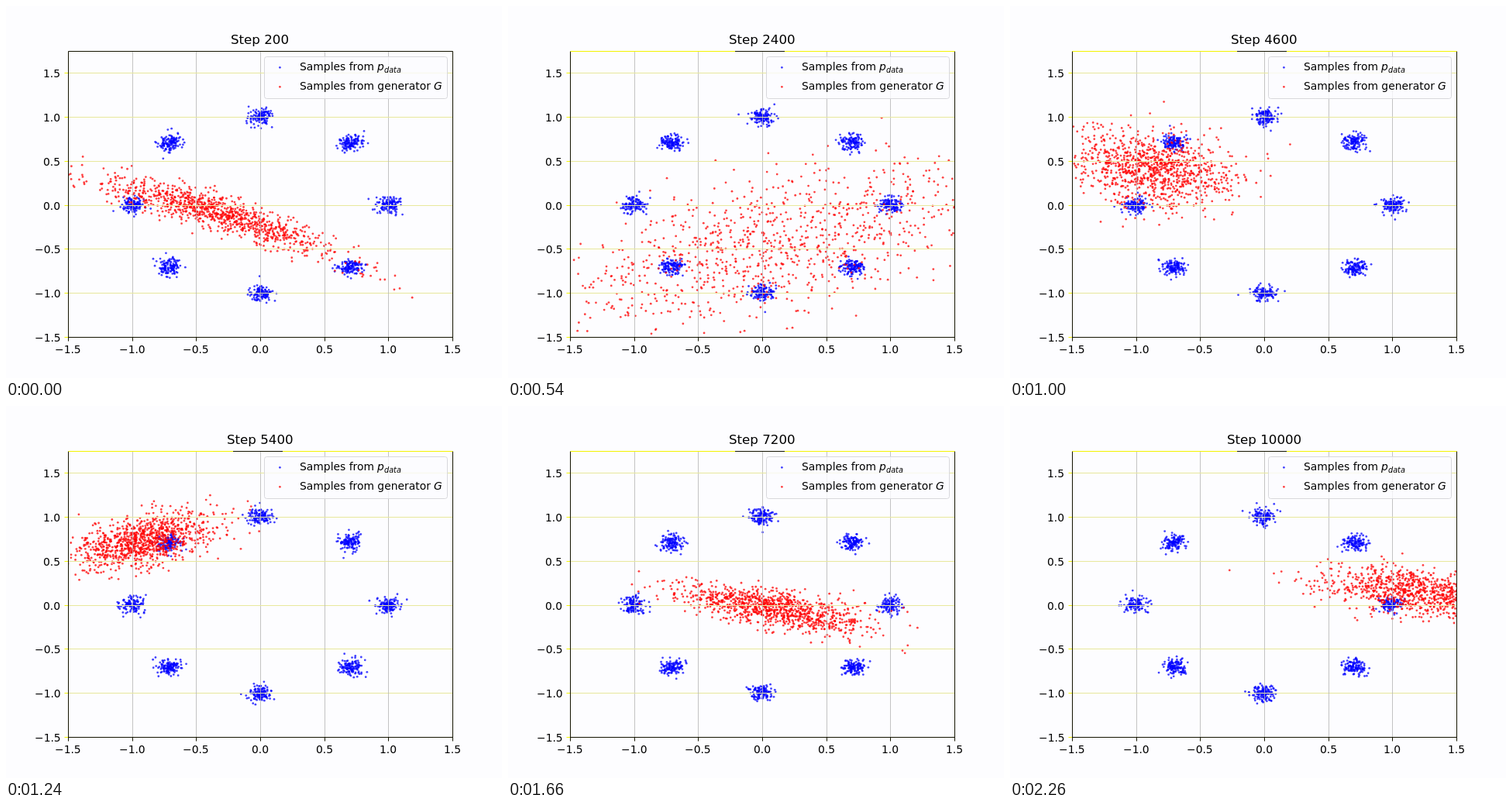
These frames come from a looping animation (640x480 px, 2280 ms). An HTML page with a canvas:

```html
<!DOCTYPE html>
<html lang="en">
<head>
<meta charset="utf-8">
<title>Generator samples</title>
<style>
  html, body { margin: 0; width: 100%; height: 100%; overflow: hidden; background: #fdfdff; }
  canvas { display: block; width: 640px; height: 480px; }
</style>
</head>
<body>
<canvas id="stage" width="640" height="480"></canvas>
<script>
const ctx = document.getElementById('stage').getContext('2d');
const FONT = '"DejaVu Sans", sans-serif';
const LOOP = 2280, STEPS = 50, SAMPLES = 1000;
const BOX = { left: 80, top: 57.6, right: 576, bottom: 427.2 };
const COLOR = { paper: '#fdfdff', data: '#0000ff', generated: '#ff0000',
                rowGrid: '#e8e89c', columnGrid: '#b4b4b4', spine: '#141400', yellow: '#f4f400' };

const px = x => 328 + x * 496 / 3;
const py = y => BOX.bottom - (y + 1.5) * 369.6 / 3.25;
const snap = v => Math.round(v) + 0.5;

// Generator cloud in pixels: y = my + slope*dx + bend*dx^2, with spreads sx and sy.
const CLOUDS = [
  { at: 0,  mx: 272, my: 266, sx: 78,  sy: 11, slope: 0.3,   bend: 0.0003 },
  { at: 11, mx: 340, my: 306, sx: 145, sy: 46, slope: -0.25, bend: 0 },
  { at: 17, mx: 190, my: 256, sx: 57,  sy: 35, slope: 0.52,  bend: 0 },
  { at: 26, mx: 176, my: 174, sx: 46,  sy: 16, slope: -0.2,  bend: 0 },
  { at: 35, mx: 345, my: 261, sx: 62,  sy: 12, slope: 0.17,  bend: 0.0001 },
  { at: 41, mx: 262, my: 204, sx: 41,  sy: 12, slope: 0.4,   bend: 0 },
  { at: 49, mx: 535, my: 241, sx: 64,  sy: 15, slope: 0.11,  bend: 0 }
];

function cloudAt(step) {
  const next = Math.max(1, CLOUDS.findIndex(c => c.at >= step));
  const a = CLOUDS[next - 1], b = CLOUDS[next];
  const k = (step - a.at) / (b.at - a.at);
  const mixed = {};
  for (const key in a) mixed[key] = a[key] + (b[key] - a[key]) * k;
  return mixed;
}

function randomSource(seed) {
  let s = seed >>> 0;
  return () => {
    s = (s + 0x6D2B79F5) >>> 0;
    let t = Math.imul(s ^ (s >>> 15), s | 1);
    t ^= t + Math.imul(t ^ (t >>> 7), t | 61);
    return ((t ^ (t >>> 14)) >>> 0) / 4294967296;
  };
}

function gaussianSource(seed) {
  const random = randomSource(seed);
  return () => Math.sqrt(-2 * Math.log(1 - random())) * Math.cos(2 * Math.PI * random());
}

// Every third step, beginning with the second, is held for 100 ms.
const holdOf = step => step % 3 === 1 && step < STEPS - 1 ? 100 : 20;

function stepAt(time) {
  let step = 0;
  for (let end = holdOf(0); time >= end && step < STEPS - 1; end += holdOf(step)) step++;
  return step;
}

function dot(x, y, color) {
  ctx.globalAlpha = 0.74;
  ctx.fillStyle = color;
  ctx.beginPath();
  ctx.arc(x, y, 1.4, 0, 2 * Math.PI);
  ctx.fill();
  ctx.globalAlpha = 1;
}

function line(x1, y1, x2, y2, color, width = 1) {
  ctx.strokeStyle = color;
  ctx.lineWidth = width;
  ctx.beginPath();
  ctx.moveTo(x1, y1);
  ctx.lineTo(x2, y2);
  ctx.stroke();
}

// Starts the text on a whole pixel and returns its right end.
function text(string, x, y, { size = 13.89, shift = 0, style = '' } = {}) {
  ctx.font = `${style} ${size}px ${FONT}`;
  ctx.fillStyle = '#000';
  const width = ctx.measureText(string).width;
  const left = Math.round(x - width * shift);
  ctx.fillText(string, left, Math.round(y));
  return left + width;
}

function drawSamples(step) {
  const gauss = gaussianSource(step * 7919 + 17);
  const cloud = cloudAt(step);
  ctx.save();
  ctx.beginPath();
  ctx.rect(BOX.left, BOX.top, BOX.right - BOX.left, BOX.bottom - BOX.top);
  ctx.clip();
  for (let i = 0; i < SAMPLES; i++) {
    const angle = (i % 8) * Math.PI / 4;
    dot(px(Math.cos(angle) + 0.047 * gauss()), py(Math.sin(angle) + 0.047 * gauss()), COLOR.data);
  }
  for (let i = 0; i < SAMPLES; i++) {
    const dx = cloud.sx * gauss();
    const y = cloud.my + cloud.slope * dx + cloud.bend * dx * dx + cloud.sy * gauss();
    dot(cloud.mx + dx, y, COLOR.generated);
  }
  ctx.restore();
}

function drawAxes(step) {
  const label = v => v.toFixed(1).replace('-', '\u2212');
  const left = snap(BOX.left), right = snap(BOX.right);
  const top = snap(BOX.top), bottom = snap(BOX.bottom);
  for (let v = -1.5; v <= 1.5; v += 0.5) {
    const x = snap(px(v)), y = snap(py(v));
    line(x, top, x, bottom, COLOR.columnGrid, 0.8);
    line(left, y, right, y, COLOR.rowGrid);
    line(x, bottom, x, bottom + 5, COLOR.spine);
    line(left - 5, y, left, y, COLOR.yellow);
    text(label(v), px(v), 448, { shift: 0.5 });
    text(label(v), 70.3, y + 5, { shift: 1 });
  }
  line(left, top, left, bottom + 0.5, COLOR.spine);
  line(right, top, right, bottom + 0.5, COLOR.spine);
  line(left, bottom, right, bottom, COLOR.spine);
  line(left, top, right, top, step ? COLOR.yellow : COLOR.spine);
  if (step) line(293, top, 357, top, COLOR.spine);
}

function drawLegend() {
  ctx.beginPath();
  ctx.roundRect(333.5, 65.5, 236, 54, 3);
  ctx.fillStyle = 'rgba(253,253,255,0.8)';
  ctx.fill();
  ctx.strokeStyle = '#d8d8dc';
  ctx.lineWidth = 1;
  ctx.stroke();
  dot(353.4, 79.3, COLOR.data);
  dot(353.4, 104.3, COLOR.generated);
  let x = text('Samples from ', 379, 83);
  x = text('p', x, 83, { style: 'italic' });
  text('data', x, 86, { size: 9.72, style: 'italic' });
  x = text('Samples from generator ', 379, 108);
  text('G', x, 108, { style: 'italic' });
}

function draw(step) {
  ctx.fillStyle = COLOR.paper;
  ctx.fillRect(0, 0, 640, 480);
  drawSamples(step);
  drawAxes(step);
  drawLegend();
  text(`Step ${(step + 1) * 200}`, 328, 49, { size: 16.67, shift: 0.5 });
}

let shown = -1;
const start = performance.now();
function tick() {
  const step = stepAt((performance.now() - start) % LOOP);
  if (step !== shown) draw(shown = step);
  requestAnimationFrame(tick);
}
tick();
</script>
</body>
</html>
```
